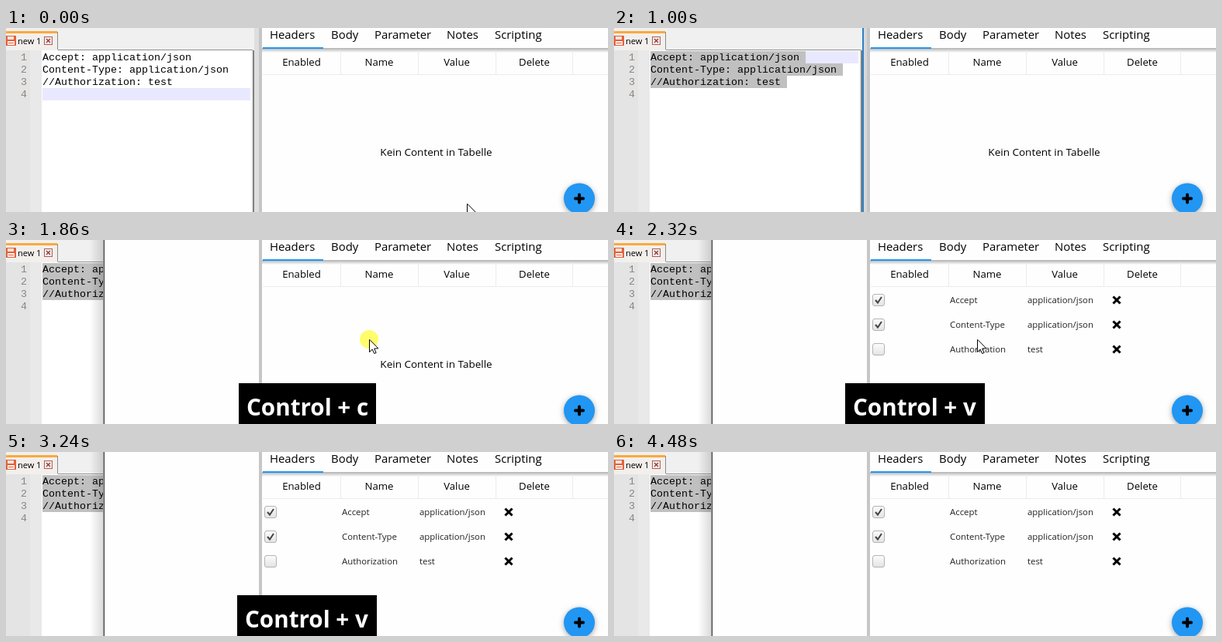
Animation, 776 px wide and 239 px high, one loop 4.56 s. Source, as an HTML page with a canvas:

```html
<!DOCTYPE html>
<html lang="de">
<head>
<meta charset="utf-8">
<title>Paste headers into a table</title>
<style>
  html, body { margin: 0; width: 100%; height: 100%; overflow: hidden; background: #fff; }
  canvas { display: block; width: 776px; height: 239px; }
</style>
</head>
<body>
<canvas id="stage" width="776" height="239"></canvas>
<script>
const ctx = document.getElementById('stage').getContext('2d');
const LOOP = 4560, W = 776, H = 239;
const UI = '"Open Sans", "Noto Sans", sans-serif';
const MONO = '13.333px "Liberation Mono", monospace';
const BLUE = '#2196f3';
const LINES = ['Accept: application/json', 'Content-Type: application/json', '//Authorization: test', ''];
const TEXT_X = 47, CHAR = 8, TOP = 30, ROW = 16;
const PANEL_AT = 1780, PASTE_AT = 2320;

function rect(x, y, w, h, color) {
  ctx.fillStyle = color;
  ctx.fillRect(x, y, w, h);
}

function text(str, x, y, font, color = '#000', align = 'left') {
  ctx.font = font;
  ctx.fillStyle = color;
  ctx.textAlign = align;
  ctx.fillText(str, x, y);
}

function path(points, color, width, cap = 'butt') {
  ctx.beginPath();
  points.forEach(([x, y], i) => i ? ctx.lineTo(x, y) : ctx.moveTo(x, y));
  ctx.strokeStyle = color;
  ctx.lineWidth = width;
  ctx.lineCap = cap;
  ctx.stroke();
}

function disc(x, y, r, color) {
  ctx.beginPath();
  ctx.arc(x, y, r, 0, 7);
  ctx.fillStyle = color;
  ctx.fill();
}

function gradient(x0, y0, x1, y1, from, to) {
  const g = ctx.createLinearGradient(x0, y0, x1, y1);
  g.addColorStop(0, from);
  g.addColorStop(1, to);
  return g;
}

// Index of the current step when `count` changes spread evenly over [start, end].
const stepAt = (t, start, end, count) =>
  Math.min(count - 1, Math.floor((t - start) / (end - start) * (count - 1) + 0.03));

const glide = (a, b, p) => [a[0] + (b[0] - a[0]) * p, a[1] + (b[1] - a[1]) * p];

// Screen recorder pointer: position, plus whether the button is down.
function pointerAt(t) {
  const start = [594, 228], rest = [248, 96], click = [468, 129];
  if (t < 70) return { at: start };
  if (t < 620) {
    const p = (stepAt(t, 70, 450, 6) + 1) / 6;
    return { at: glide(start, rest, p * p * (3 - 2 * p)) };
  }
  if (t < 1000) {
    const drag = [rest, [168, 75], [96, 57], [48, 40], [10, 16]];
    return { at: drag[Math.min(4, stepAt(t, 620, 1000, 6))], down: true };
  }
  if (t < 1400) return null;
  if (t < 1780) return { at: glide([14, 20], click, (stepAt(t, 1400, 1780, 6) + 1) / 6) };
  if (t < 2780) return { at: click, down: t < 1940 };
  if (t < 3235) return { at: glide([487, 127], [710, 236], stepAt(t, 2780, 3240, 7) / 5) };
  return null;
}

// Caret of the running selection; its anchor is the start of the last line.
function caretAt(t, pointer) {
  if (t < 620) return { line: 3, col: 0 };
  if (t >= 850) return { line: 0, col: 0 };
  const [x, y] = pointer.at;
  const line = Math.min(3, Math.max(0, Math.floor((y - TOP) / ROW)));
  const col = Math.min(LINES[line].length, Math.max(0, Math.ceil((x - TEXT_X) / CHAR)));
  return { line, col };
}

function drawTab() {
  rect(0, 0, 326, 29, '#f1f0f0');
  rect(67, 28, 251, 1, '#909090');
  rect(0, 4, 66, 25, '#f2efed');
  rect(0, 4, 66, 3, '#faaa3c');
  rect(66, 5, 1, 23, '#8a8a8a');
  rect(0, 10, 13, 13, '#e2603c');
  rect(2, 11, 8, 4, '#fbe4da');
  rect(2, 17, 9, 5, '#fff3ec');
  rect(3, 19, 7, 1, '#e2603c');
  text('new 1', 15, 21, '11px ' + UI);
  ctx.strokeStyle = '#a8605c';
  ctx.lineWidth = 1;
  ctx.strokeRect(49.5, 11.5, 10, 10);
  path([[52, 14], [57, 19]], '#a03c38', 1.5);
  path([[57, 14], [52, 19]], '#a03c38', 1.5);
}

function drawEditor(t, pointer) {
  drawTab();
  rect(0, 29, 316, H, '#fff');
  rect(0, 29, 31, H, '#e4e4e4');
  rect(31, 29, 15, H, '#e9e9e9');

  const caret = caretAt(t, pointer);
  rect(TEXT_X, TOP + caret.line * ROW, 268, ROW, '#e8e8ff');
  LINES.forEach((line, i) => {
    const y = TOP + i * ROW;
    if (i >= caret.line && i < 3) {
      const from = i === caret.line ? caret.col : 0;
      rect(TEXT_X + from * CHAR, y, (line.length + 1 - from) * CHAR, ROW, '#c0c0c0');
    }
    text(i + 1, 19, y + 12, MONO, '#8c8480');
    text(line, TEXT_X, y + 12, MONO);
  });
  if (t >= 620 && t < 850) {
    rect(TEXT_X + caret.col * CHAR - 1, TOP + caret.line * ROW, 1, ROW, '#8000ff');
  }

  const focused = t >= 620;
  rect(316, 29, 2, H, '#f0f0f0');
  rect(318, 29, 2, H, '#808080');
  rect(320, 0, 6, H, focused ? '#d4d8dc' : '#dedede');
  if (focused) rect(320, 0, 2, H, '#2d82c4');
}

function drawFrontWindow() {
  rect(108, 0, 17, H, gradient(108, 0, 125, 0, 'rgba(0,0,0,0)', 'rgba(0,0,0,.14)'));
  rect(125, 0, 1, H, '#9a9a9a');
  rect(126, 0, 1, H, '#5c5c5c');
  rect(127, 0, 1, H, '#d8d8d8');
  rect(128, 0, 198, H, '#fefefe');
}

function drawCheckbox(x, y, checked) {
  ctx.beginPath();
  ctx.roundRect(x + 0.5, y + 0.5, 15, 15, 2.5);
  ctx.fillStyle = gradient(0, y, 0, y + 16, '#fdfdfd', '#e2e2e2');
  ctx.fill();
  ctx.strokeStyle = '#b4b4b4';
  ctx.lineWidth = 1;
  ctx.stroke();
  if (checked) path([[x + 4, y + 8], [x + 7, y + 11.5], [x + 12, y + 4]], '#444', 2);
}

function drawRows() {
  const rows = [
    ['Accept', 'application/json', true],
    ['Content-Type', 'application/json', true],
    ['Authorization', 'test', false]
  ];
  rows.forEach(([name, value, on], i) => {
    const y = 78 + i * 32;
    drawCheckbox(333, y - 8, on);
    text(name, 433, y + 4, '11.4px ' + UI, '#222');
    text(value, 533, y + 4, '11.4px ' + UI, '#222');
    path([[644.5, y - 3.5], [651.5, y + 3.5]], '#000', 3, 'square');
    path([[651.5, y - 3.5], [644.5, y + 3.5]], '#000', 3, 'square');
  });
}

function drawTable(t) {
  rect(326, 0, 5, H, '#c6c6c6');
  rect(330, 0, W, H, '#fefefe');
  rect(330, 26, W, 6, gradient(0, 26, 0, 32, '#b0b0b0', '#fefefe'));
  rect(331, 25, 78, 2, BLUE);

  const tabs = { Headers: 340, Body: 419, Parameter: 475, Notes: 568, Scripting: 630 };
  for (const name in tabs) text(name, tabs[name], 14, '14.9px ' + UI);

  ['Enabled', 'Name', 'Value', 'Delete'].forEach((name, i) => {
    text(name, 381 + i * 100, 49, '13.2px ' + UI, '#000', 'center');
    rect((i < 3 ? 431 : 430) + i * 100, 29, 1, 32, '#ececec');
  });
  rect(331, 60, W, 1, '#ececec');

  if (t < PASTE_AT) text('Kein Content in Tabelle', 554.5, 166, '13.5px ' + UI, '#000', 'center');
  else drawRows();

  ctx.save();
  ctx.shadowColor = 'rgba(0,0,0,.35)';
  ctx.shadowBlur = 7;
  ctx.shadowOffsetY = 2;
  disc(739, 221.5, 20, BLUE);
  ctx.restore();
  path([[734, 221.5], [744, 221.5]], '#000', 4, 'round');
  path([[739, 216.5], [739, 226.5]], '#000', 4, 'round');
}

function drawKeys(t) {
  const fadeIn = Math.min(1, (stepAt(t, 1170, 1323, 3) + 1) / 3);
  const fadeOut = 1 - (stepAt(t, 3320, 3470, 3) + 1) / 3;
  const alpha = t < 1170 ? 0 : t < 3320 ? fadeIn : fadeOut;
  if (alpha <= 0) return;
  const paste = t >= 2240;
  ctx.globalAlpha = alpha;
  if (paste) rect(298, 186, 180, 53, '#000');
  else rect(300, 186, 177, 53, '#000');
  text('Control + ' + (paste ? 'v' : 'c'), paste ? 308 : 310, 228, 'bold 29.6px ' + UI, '#fff');
  ctx.globalAlpha = 1;
}

function drawPointer({ at: [x, y], down }) {
  const overText = x > 46 && x < 316 && y > 28 && y < 120;
  if (down) {
    if (overText) disc(x - 2, y, 11, 'rgba(240,212,50,.85)');
    else disc(x, y, 12, 'rgba(255,252,70,.8)');
  }
  ctx.save();
  ctx.translate(Math.round(x), Math.round(y));
  if (overText) {
    path([[0.5, -7], [0.5, 8]], '#222', 1);
    path([[-3, -7.5], [4, -7.5]], '#222', 1);
    path([[-3, 8.5], [4, 8.5]], '#222', 1);
  } else {
    ctx.beginPath();
    const arrow = [[0, 0], [0, 16], [3.7, 12.6], [6.2, 18], [8.6, 17], [6.2, 11.6], [11, 11.3]];
    arrow.forEach(([ax, ay]) => ctx.lineTo(ax + 0.5, ay + 0.5));
    ctx.closePath();
    ctx.fillStyle = '#fff';
    ctx.fill();
    ctx.strokeStyle = '#000';
    ctx.lineWidth = 1;
    ctx.stroke();
  }
  ctx.restore();
}

function draw(now) {
  const t = now % LOOP;
  const pointer = pointerAt(t);
  rect(0, 0, W, H, '#fff');
  drawEditor(t, pointer);
  if (t >= PANEL_AT) drawFrontWindow();
  drawTable(t);
  drawKeys(t);
  if (pointer) drawPointer(pointer);
}

const begin = performance.now();
function frame() {
  draw(performance.now() - begin);
  requestAnimationFrame(frame);
}
frame();
</script>
</body>
</html>
```
